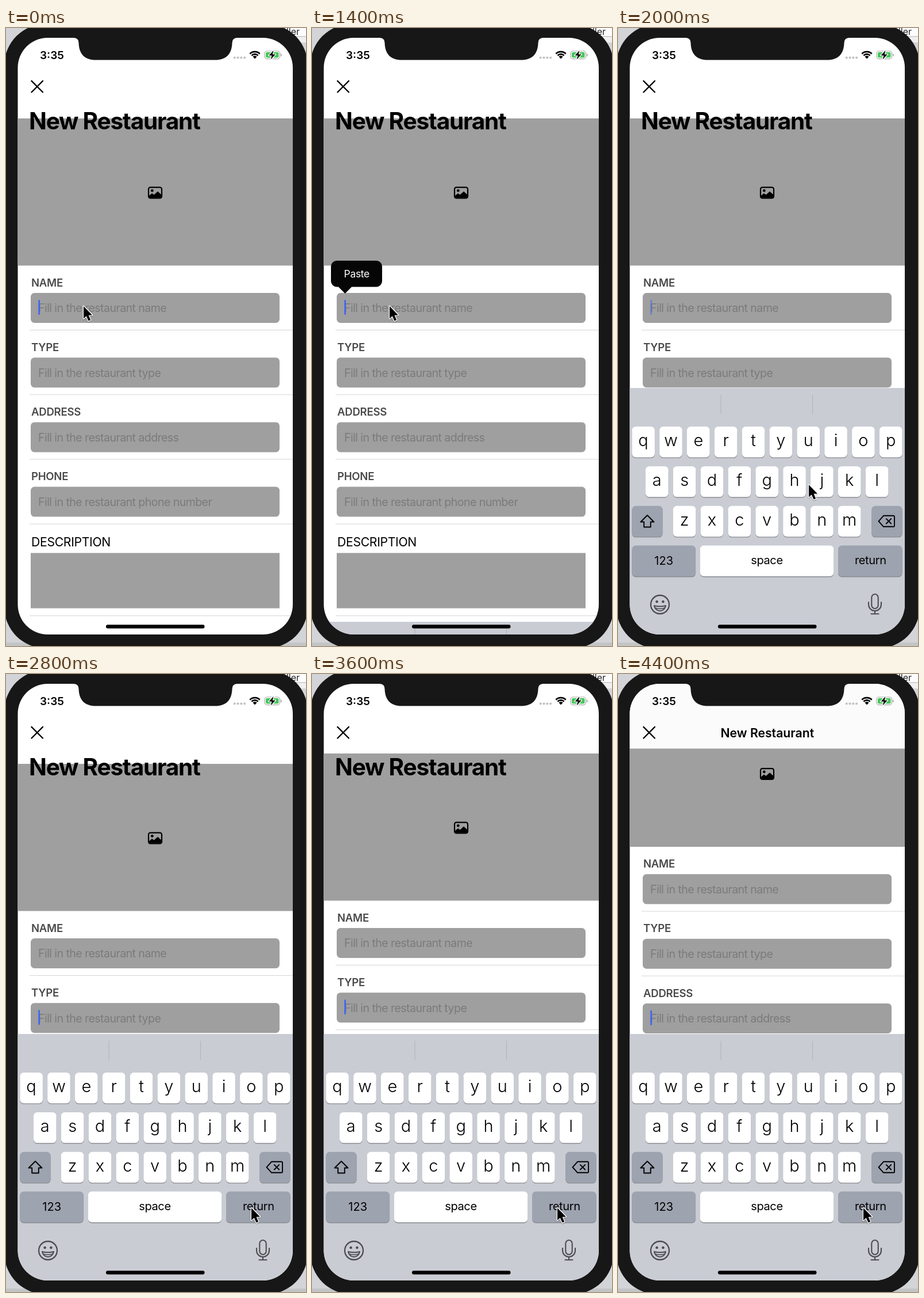
An HTML page with a canvas that plays this animation: 522 by 1073 pixels, repeating every 4.6 s.

```html
<!DOCTYPE html>
<html lang="en">
<head>
<meta charset="utf-8">
<title>New Restaurant form</title>
<style>
html, body { margin: 0; width: 100%; height: 100%; overflow: hidden; background: #171717; }
canvas { display: block; width: 522px; height: 1073px; }
</style>
</head>
<body>
<canvas id="stage"></canvas>
<script>
const W = 522, H = 1073, LOOP = 4600, STEP = 200;
const GREY = '#9f9f9f', BEZEL = '#171717';
const FIELDS = ['name', 'type', 'address', 'phone number'];
const LABELS = ['NAME', 'TYPE', 'ADDRESS', 'PHONE'];
const PITCH = 112.2;

const canvas = document.getElementById('stage');
const c = canvas.getContext('2d');
const dpr = window.devicePixelRatio || 1;
canvas.width = W * dpr;
canvas.height = H * dpr;

// Keys are [time, value]; values between keys are linear.
const SCROLL = [[2600, 0], [2800, 1], [3000, 11], [3200, 12.5], [3400, 12.5], [3600, 19], [3800, 105], [4000, 112.5]];
const KEYBOARD = [[1200, 1053], [1400, 1031], [1600, 682], [1800, 628], [2000, 625]];
const MENU = [[200, 0], [400, 0.5], [600, 1], [1400, 1], [1600, 0.52], [1800, 0]];
const CARET = [[400, 1], [600, 0.45], [800, 0], [1000, 0], [1200, 1], [1800, 1], [2000, 0.55], [2200, 0], [2400, 0], [2600, 1]];
const MOUSE_X = [[1600, 135], [1800, 184], [2000, 332], [2200, 394], [2400, 426], [2600, 427]];
const MOUSE_Y = [[1600, 483], [1800, 561], [2000, 793], [2200, 907], [2400, 926], [2600, 927]];

function at(keys, t) {
  if (t <= keys[0][0]) return keys[0][1];
  for (let i = 1; i < keys.length; i++) {
    const [t0, a] = keys[i - 1], [t1, b] = keys[i];
    if (t <= t1) return a + (b - a) * (t - t0) / (t1 - t0);
  }
  return keys[keys.length - 1][1];
}

function rect(x, y, w, h, color) {
  c.fillStyle = color;
  c.fillRect(x, y, w, h);
}

function round(x, y, w, h, r, color) {
  c.beginPath();
  c.roundRect(x, y, w, h, r);
  c.fillStyle = color;
  c.fill();
}

function disc(x, y, r, color) {
  c.beginPath();
  c.arc(x, y, r, 0, Math.PI * 2);
  c.fillStyle = color;
  c.fill();
}

function poly(points, closed = true) {
  c.beginPath();
  points.forEach(([x, y]) => c.lineTo(x, y));
  if (closed) c.closePath();
}

function stroke(color, width) {
  c.strokeStyle = color;
  c.lineWidth = width;
  c.stroke();
}

// cy is the middle of the capital letters.
function text(s, x, cy, size, { weight = 400, color = '#000', align = 'left', track = 0 } = {}) {
  c.font = `${weight} ${size}px Inter, "Open Sans", sans-serif`;
  c.letterSpacing = `${track * size}px`;
  c.textAlign = align;
  c.fillStyle = color;
  c.fillText(s, x, cy + size * 0.3635);
}

function desktop() {
  rect(0, 0, W, H, '#d3d4d7');
  rect(440, 0, 82, 14, '#fdfdfd');
  rect(440, 14, 82, 1.5, '#c9c9c9');
  rect(440, 15.5, 82, 10, '#f0f0f0');
  rect(440, 25.5, 82, 1, '#cfcfcf');
  rect(0, 1067, W, 6, '#c3c4c6');
  text('ller', 511, 6, 16, { color: '#262626', align: 'right' });
  round(-3, -7, 528, 1084, 72, BEZEL);
}

function picture(x, y) {
  c.beginPath();
  c.roundRect(x - 11.5, y - 9.4, 23, 18.8, 3.2);
  stroke('#000', 2.2);
  disc(x - 5.2, y - 3.7, 2.4, '#000');
  poly([[x - 11, y + 8.5], [x - 11, y + 5.5], [x - 5.5, y + 1], [x - 2, y + 3.6], [x + 4.5, y - 2.2], [x + 11, y + 3.6], [x + 11, y + 8.5]]);
  c.fillStyle = '#000';
  c.fill();
}

function line(y) {
  rect(41, y, 458, 1, '#d6d6d6');
}

function form(t, focus) {
  rect(20, 157, 479, 255.5, GREY);
  picture(259.5, 286);
  FIELDS.forEach((name, i) => {
    const y = 460 + i * PITCH;
    text(LABELS[i], 44, y - 18, 18.6, { weight: 600, color: '#4a4a4a', track: -0.015 });
    round(43, y, 433, 52, 6.5, GREY);
    text('Fill in the restaurant ' + name, 56, y + 26.3, 19.6, { color: '#7b7b7b', track: -0.03 });
    if (i === focus) {
      c.globalAlpha = at(CARET, t);
      round(56.3, y + 12, 2.6, 26, 1.2, '#3d64f2');
      c.globalAlpha = 1;
    }
    line(y + 64);
  });
  text('DESCRIPTION', 44, 892.5, 21.2, { track: -0.015 });
  rect(43, 911.5, 433, 96, GREY);
  line(1020);
}

function menu(alpha) {
  if (!alpha) return;
  c.globalAlpha = alpha;
  const l = 33, r = 122, top = 404, b = 449.5, k = 10;
  c.beginPath();
  c.moveTo(l + k, top);
  c.arcTo(r, top, r, b, k);
  c.arcTo(r, b, l, b, k);
  c.lineTo(69, b);
  c.lineTo(57.5, 461);
  c.lineTo(46, b);
  c.arcTo(l, b, l, top, k);
  c.arcTo(l, top, r, top, k);
  c.fillStyle = '#060606';
  c.fill();
  text('Paste', 77.7, 427, 17.5, { color: '#fff', align: 'center', track: -0.02 });
  c.globalAlpha = 1;
}

function key(x, y, w, color = '#fff') {
  round(x, y + 1.4, w, 53.4, 6.5, '#898b90');
  round(x, y, w, 53.4, 6.5, color);
}

function smiley(x, y) {
  const ink = '#4b4c50';
  c.beginPath();
  c.arc(x, y, 16, 0, Math.PI * 2);
  stroke(ink, 2.3);
  disc(x - 5.4, y - 5, 2.3, ink);
  disc(x + 5.4, y - 5, 2.3, ink);
  c.beginPath();
  c.moveTo(x - 10, y + 2);
  c.quadraticCurveTo(x, y + 4.5, x + 10, y + 2);
  c.bezierCurveTo(x + 8, y + 14, x - 8, y + 14, x - 10, y + 2);
  stroke(ink, 2);
  c.beginPath();
  c.moveTo(x - 8, y + 6);
  c.quadraticCurveTo(x, y + 8.5, x + 8, y + 6);
  stroke(ink, 1.6);
}

function mic(x, y) {
  c.beginPath();
  c.roundRect(x - 5.7, y - 17, 11.4, 25, 5.7);
  c.moveTo(x - 11, y - 3);
  c.lineTo(x - 11, y + 1);
  c.arc(x, y + 1, 11, Math.PI, 0, true);
  c.lineTo(x + 11, y - 3);
  c.moveTo(x, y + 12);
  c.lineTo(x, y + 17);
  c.moveTo(x - 6.5, y + 17.3);
  c.lineTo(x + 6.5, y + 17.3);
  stroke('#4b4c50', 2.1);
}

function shiftIcon(x, y) {
  poly([[x, y - 10.5], [x + 11.5, y + 1], [x + 5.8, y + 1], [x + 5.8, y + 10], [x - 5.8, y + 10], [x - 5.8, y + 1], [x - 11.5, y + 1]]);
  stroke('#000', 1.9);
}

function deleteIcon(x, y) {
  poly([[x - 14, y], [x - 5.5, y - 9.5], [x + 12.5, y - 9.5], [x + 13.5, y - 8.5], [x + 13.5, y + 8.5], [x + 12.5, y + 9.5], [x - 5.5, y + 9.5]]);
  stroke('#000', 1.9);
  cross(x + 3.5, y, 4.2, 1.9);
}

function cross(x, y, r, width) {
  c.beginPath();
  c.moveTo(x - r, y - r);
  c.lineTo(x + r, y + r);
  c.moveTo(x + r, y - r);
  c.lineTo(x - r, y + r);
  stroke('#000', width);
}

function keyboard(top) {
  const DARK = '#9da3af';
  c.save();
  c.translate(0, top - 625);
  rect(20, 625, 479, 500, '#c9ccd3');
  [179, 338.5].forEach(x => rect(x - 0.5, 637, 1, 33, '#b0b3ba'));
  [['qwertyuiop', 24.3], ['asdfghjkl', 48], ['zxcvbnm', 95.8]].forEach(([row, x0], r) => {
    const y = 692 + r * 68.9;
    [...row].forEach((ch, i) => {
      const x = x0 + i * 47.85;
      key(x, y, 39.6);
      text(ch, x + 19.8, y + 23.4, 29, { weight: 350, align: 'center' });
    });
  });
  key(24.3, 829.8, 53.4, DARK);
  shiftIcon(51, 856.5);
  key(441.2, 829.8, 53.4, DARK);
  deleteIcon(467.5, 856.3);
  key(24.3, 898.6, 110.8, DARK);
  key(142.8, 898.6, 232.5);
  key(383, 898.6, 111.6, DARK);
  text('123', 79.7, 925, 20, { align: 'center' });
  text('space', 259, 923.7, 20, { align: 'center', track: -0.02 });
  text('return', 439.3, 923.7, 20, { align: 'center', track: -0.02 });
  smiley(73, 1001);
  mic(447, 1000);
  c.restore();
}

function statusBar() {
  text('3:35', 59, 47, 19, { weight: 600 });
  for (let i = 0; i < 4; i++) disc(397.7 + i * 5.8, 51.5, 2.1, '#c2c2c2');

  // Wi-Fi fan
  c.save();
  c.lineCap = 'butt';
  const fan = Math.PI * 0.25, up = -Math.PI / 2;
  [[12.2, 2.7], [7.9, 2.6]].forEach(([r, w]) => {
    c.beginPath();
    c.arc(433, 53.3, r, up - fan, up + fan);
    stroke('#000', w);
  });
  c.beginPath();
  c.moveTo(433, 53.5);
  c.arc(433, 53.3, 5, up - fan, up + fan);
  c.closePath();
  c.fillStyle = '#000';
  c.fill();
  c.restore();

  c.beginPath();
  c.roundRect(450, 40, 26.5, 13.6, 4);
  stroke('#a9a9a9', 1.2);
  round(452, 42, 22.5, 9.6, 2.3, '#43c759');
  round(478, 44.5, 1.7, 4.8, [0, 1.5, 1.5, 0], '#a9a9a9');
  poly([[465.5, 38.8], [457.5, 47.7], [462.5, 47.7], [460.5, 54.8], [468.8, 45.7], [463.7, 45.7]]);
  stroke('#fff', 2.6);
  c.fillStyle = '#000';
  c.fill();
}

function notch() {
  c.beginPath();
  c.moveTo(118, 16);
  c.lineTo(118, 17);
  c.quadraticCurveTo(126.5, 17.5, 126.5, 26);
  c.bezierCurveTo(127, 45, 137, 55.5, 156, 55.5);
  c.lineTo(364, 55.5);
  c.bezierCurveTo(383, 55.5, 393, 45, 393.5, 26);
  c.quadraticCurveTo(393.5, 17.5, 402, 17);
  c.lineTo(402, 16);
  c.closePath();
  c.fillStyle = BEZEL;
  c.fill();
}

function pointer(x, y) {
  c.save();
  c.translate(x, y);
  c.shadowColor = 'rgba(0,0,0,0.3)';
  c.shadowBlur = 2 * dpr;
  c.shadowOffsetY = dpr;
  poly([[0, 0], [0, 21.5], [4.8, 17.2], [8.5, 25.6], [12.2, 24], [8.6, 15.8], [15, 15.4]]);
  stroke('#fff', 2.6);
  c.shadowColor = 'transparent';
  c.fillStyle = '#000';
  c.fill();
  c.restore();
}

function draw(t) {
  const compact = t >= 3800;
  const focus = t < 2800 ? 0 : t < 3800 ? 1 : 2;
  c.setTransform(dpr, 0, 0, dpr, 0, 0);
  c.lineJoin = c.lineCap = 'round';
  desktop();

  c.save();
  c.beginPath();
  c.roundRect(20.5, 17, 478.5, 1036, 52);
  c.clip();
  rect(20, 17, 480, 1037, '#fff');
  c.save();
  c.translate(0, -at(SCROLL, t));
  form(t, focus);
  c.restore();
  if (compact) {
    rect(20, 17, 480, 112.5, '#fbfbfb');
    text('New Restaurant', 259.8, 102, 21.2, { weight: 600, align: 'center' });
  } else {
    text('New Restaurant', 40, 161.5, 40.5, { weight: 700, track: -0.03 });
  }
  cross(54.2, 101.7, 9.8, 2.3);
  menu(at(MENU, t));
  const top = at(KEYBOARD, t);
  if (top < 1053) keyboard(top);
  statusBar();
  notch();
  round(174, 1036, 171.5, 6.4, 3.2, '#000');
  c.restore();

  pointer(at(MOUSE_X, t), at(MOUSE_Y, t));
}

const start = performance.now();
function tick() {
  const t = (performance.now() - start) % LOOP;
  draw(Math.floor(t / STEP) * STEP);
  requestAnimationFrame(tick);
}
tick();
</script>
</body>
</html>
```
